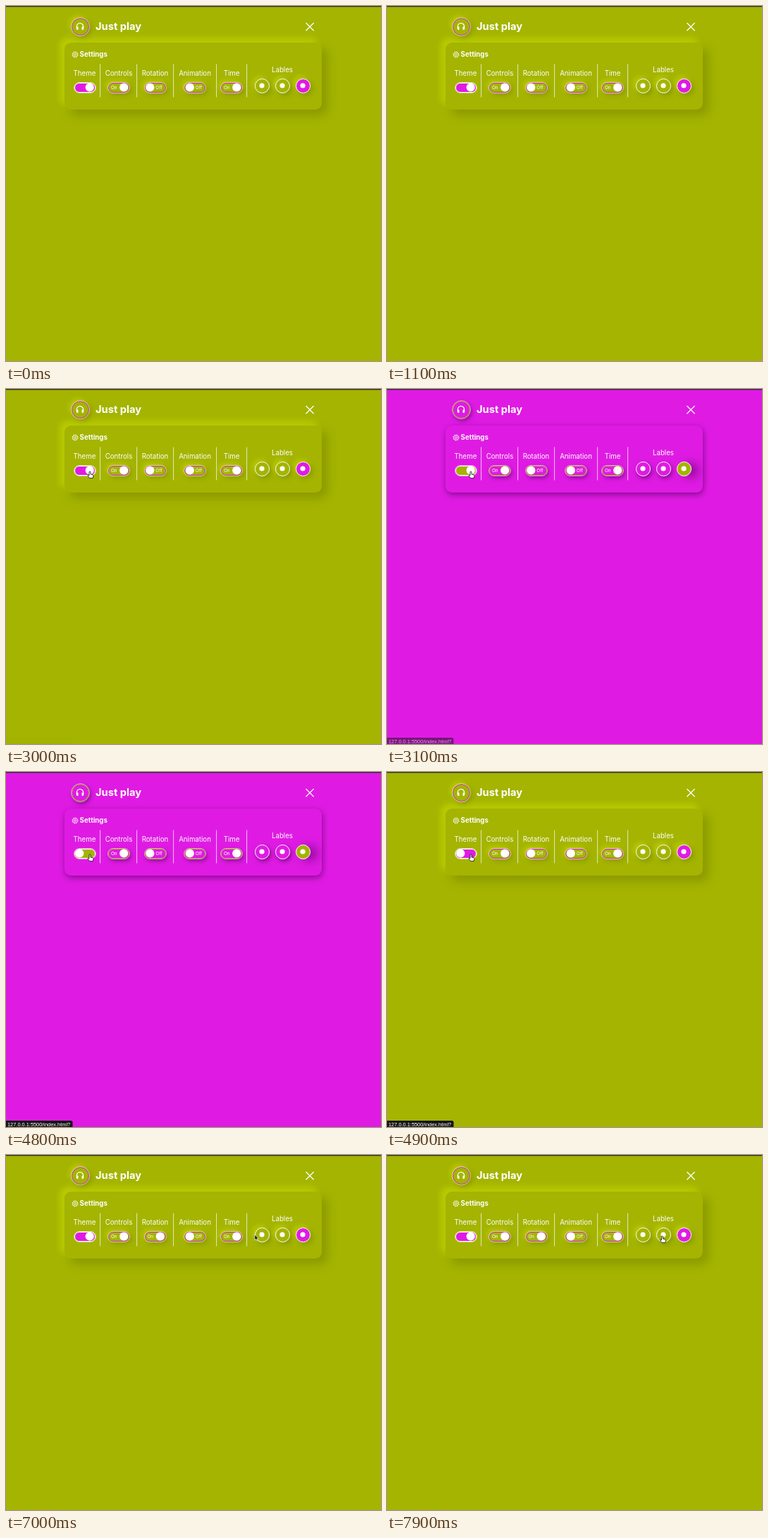
An HTML page that plays this animation: 532 px wide and 504 px high, repeating every 8000 ms.

```html
<!DOCTYPE html>
<html lang="en">
<head>
<meta charset="utf-8">
<title>Settings panel</title>
<style>
  html, body { margin: 0; width: 100%; height: 100%; overflow: hidden; }
  body {
    --bg: #a4b400; --accent: #df1be3;
    --panel-shadow: 8px 8px 14px #8b9900, -6px -6px 10px #bdcf00;
    --small-shadow: 3px 3px 7px #8b9900, -3px -3px 7px #bdcf00;
    --active-shadow: var(--small-shadow);
    position: relative; background: var(--bg);
  }
  body.pink {
    --bg: #df1be3; --accent: #a4b400;
    --panel-shadow: 1px 3px 8px #70077acc;
    --small-shadow: 2px 3px 6px #70077acc;
    --active-shadow: 9px 2px 14px #70077acc;
  }
  .box { position: absolute; box-sizing: border-box; background: var(--bg); box-shadow: var(--small-shadow); }
  .panel { left: 83px; top: 52px; width: 365px; height: 95px; border-radius: 9px; box-shadow: var(--panel-shadow); }
  .logo { left: 92.5px; top: 16.5px; width: 25px; height: 25px; border-radius: 50%; border: 1.3px solid var(--accent); outline: .5px solid #fff8; outline-offset: -.5px; }
  .toggle { top: 108.5px; width: 30px; height: 14px; border-radius: 7px; border: 1.3px solid var(--accent); outline: .5px solid #fff8; outline-offset: -.5px; }
  .toggle.theme { background: var(--accent); border-color: #fff; box-shadow: none; }
  .round { top: 102.5px; width: 21px; height: 21px; border-radius: 50%; border: 1.3px solid #fff; }
  .round.active { background: var(--accent); border-width: .8px; box-shadow: var(--active-shadow); }
  svg { position: absolute; left: 0; top: 0; }
  text { fill: #fff; font: 9.7px Inter, sans-serif; text-anchor: middle; }
  .title { font-size: 14.7px; font-weight: 700; text-anchor: start; }
  .heading { font-size: 9.7px; font-weight: 700; text-anchor: start; }
  .state { font-size: 6.4px; }
  .line { fill: none; stroke: #fff; }
  .knob { fill: #fff; stroke: var(--accent); stroke-width: 0; }
  .knob.hover { stroke-width: 1.2px; }
  #status text { font: 7.4px "Liberation Sans", sans-serif; text-anchor: start; }
</style>
</head>
<body>
<div class="box panel"></div>
<div class="box logo"></div>
<svg id="art" width="532" height="504" viewBox="0 0 532 504">
  <rect width="532" height="1.3" fill="#2c2e33"/>
  <path class="line" stroke-width="1.3" d="M100.4 30.5v-1.5a4.6 4.6 0 0 1 9.2 0v1.5"/>
  <path fill="#fff" d="M99.8 29.5h2.7v4.3h-1.3q-1.4 0-1.4-1.4zM110.2 29.5h-2.7v4.3h1.3q1.4 0 1.4-1.4z"/>
  <text class="title" x="127" y="34.2">Just play</text>
  <path class="line" stroke-width="1.25" stroke-linecap="round" d="M425.8 24.3l10.5 10.5m0-10.5l-10.5 10.5"/>
  <g class="line">
    <circle cx="98" cy="69" r="3.4" stroke-width=".8"/>
    <circle cx="98" cy="69" r="4" stroke-width=".9" stroke-dasharray="1.57"/>
    <circle cx="98" cy="69" r="1.4" stroke-width=".8"/>
  </g>
  <text class="heading" x="104.6" y="72.3">Settings</text>
  <path class="line" stroke-width=".9" stroke-opacity=".8" d="M133.6 82.5v47m52-47v47m52-47v47m61-47v47m43-47v47"/>
  <text x="392" y="94.4">Lables</text>
  <g id="controls"></g>
  <g id="status">
    <path fill="#151515" d="M0 495h92q2.5 0 2.5 2.5v6.5H0z"/>
    <text x="2" y="502.6">127.0.0.1:5500/index.html?</text>
  </g>
  <g id="cursor">
    <path id="arrow" fill="#111" stroke="#fff" stroke-width=".7" d="M0 0v7.6l1.8-1.6 1.3 2.8 1.2-.6-1.2-2.6h2.5z"/>
    <path id="hand" fill="#fff" stroke="#111" stroke-width=".8" stroke-linejoin="round" d="M-1 1a1 1 0 0 1 2 0v3l3 .7q1.1.4.9 1.6l-.7 3.3H-.3l-2.8-3.6q0-1.3 2.1-.3z"/>
  </g>
</svg>
<script>
const LOOP = 8000;
const $ = id => document.getElementById(id);
const art = $('art'), controls = $('controls');

const toggles = [
  { name: 'Theme', x: 111.5 },
  { name: 'Controls', x: 160, on: 1 },
  { name: 'Rotation', x: 211.5, on: 0 },
  { name: 'Animation', x: 268, on: 0 },
  { name: 'Time', x: 320, on: 1 }
];
const buttons = [363, 392, 421];

function addBox(className, left) {
  const box = document.createElement('div');
  box.className = 'box ' + className;
  box.style.left = left + 'px';
  art.before(box);
}

function addShape(tag, attributes, content = '') {
  const shape = document.createElementNS('http://www.w3.org/2000/svg', tag);
  for (const key in attributes) shape.setAttribute(key, attributes[key]);
  shape.textContent = content;
  controls.append(shape);
  return shape;
}

for (const toggle of toggles) {
  const isTheme = toggle.name === 'Theme';
  addBox(isTheme ? 'toggle theme' : 'toggle', toggle.x - 15);
  addShape('text', { x: toggle.x, y: 99.3 }, toggle.name);
  if (!isTheme) toggle.label = addShape('text', { class: 'state', y: 117.9 });
  toggle.knob = addShape('circle', { class: 'knob', cy: 115.5, r: 6.1 });
}
for (const x of buttons) {
  addBox(x === 421 ? 'round active' : 'round', x - 10.5);
  addShape('circle', { cx: x, cy: 113, r: 3.6, fill: '#fff' });
}

function setToggle(toggle, position, on) {
  toggle.knob.setAttribute('cx', toggle.x - 7.2 + 14.4 * position);
  if (!toggle.label) return;
  toggle.label.textContent = on ? 'On' : 'Off';
  toggle.label.setAttribute('x', toggle.x + (on ? -6.7 : 5.5));
}

const ramp = (t, start, length) => Math.min(1, Math.max(0, (t - start) / length));
const smooth = p => p * p * (3 - 2 * p);
const slide = (t, start) => smooth(ramp(t, start, 300));

// Pointer stops: time, x, y
const path = [
  [1560, 1, 211], [1900, 288, 39], [2020, 288, 39], [2300, 175, 84],
  [2900, 119, 117], [5500, 119, 117], [5880, 222, 116], [6640, 222, 116],
  [7200, 406, 112], [7550, 390.5, 115], [LOOP, 390.5, 115]
];

function pointerAt(t) {
  const next = Math.max(1, path.findIndex(stop => stop[0] > t));
  const [t0, x0, y0] = path[next - 1], [t1, x1, y1] = path[next];
  const p = smooth(ramp(t, t0, t1 - t0));
  return [x0 + (x1 - x0) * p, y0 + (y1 - y0) * p];
}

function draw(t) {
  document.body.classList.toggle('pink', t >= 3060 && t < 4860);

  const rotation = toggles[2];
  setToggle(toggles[0], 1 - slide(t, 3100) + slide(t, 4900));
  for (const toggle of toggles.slice(1)) setToggle(toggle, toggle.on, toggle.on);
  setToggle(rotation, slide(t, 5880), t >= 5900);
  rotation.knob.classList.toggle('hover', t >= 5880 && t < 6700);

  $('status').setAttribute('opacity', ramp(t, 3000, 200) - ramp(t, 6750, 200));

  const [x, y] = pointerAt(t);
  const overToggle = y > 107 && toggles.some(toggle => Math.abs(x - toggle.x) < 15);
  const overButton = buttons.some(center => Math.hypot(x - center, y - 113) < 10);
  const hand = overToggle || overButton;
  $('cursor').setAttribute('transform', `translate(${x} ${y})`);
  $('cursor').style.display = t < path[0][0] ? 'none' : '';
  $('hand').style.display = hand ? '' : 'none';
  $('arrow').style.display = hand ? 'none' : '';
}

function frame() {
  draw(performance.now() % LOOP);
  requestAnimationFrame(frame);
}
frame();
</script>
</body>
</html>
```
